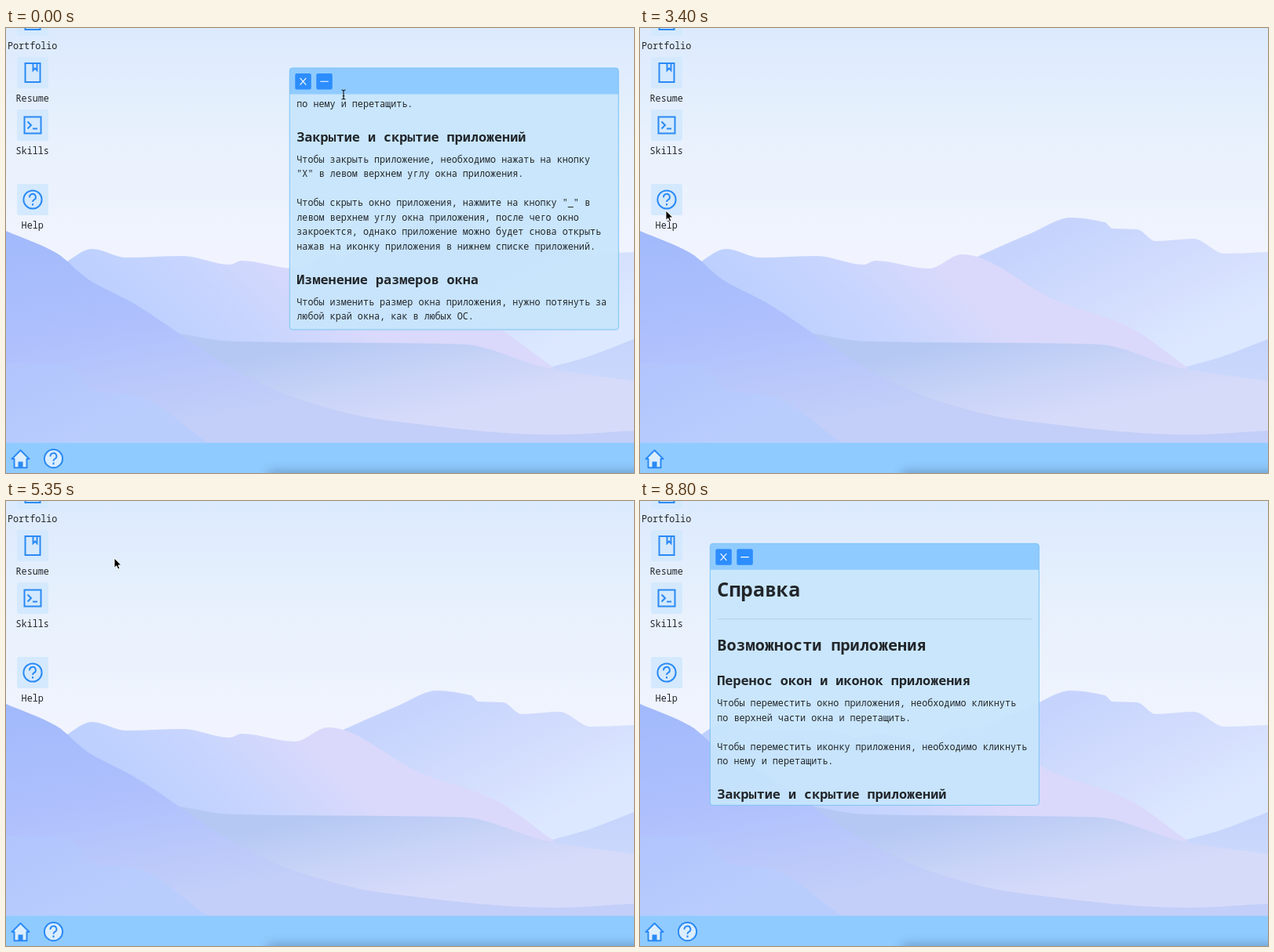
Write an HTML page that moves like this. It is 800 px wide and 568 px high and loops after 8.85 s.

```html
<!DOCTYPE html>
<html lang="ru">
<head>
<meta charset="utf-8">
<title>Desktop</title>
<style>
html, body { margin: 0; width: 100%; height: 100%; overflow: hidden; }
svg { display: block; width: 800px; height: 568px; }
text { font: 500 11.76px "Fira Code", "Fira Mono", "Noto Sans Mono", "DejaVu Sans Mono", monospace; fill: #212529; }
.h1, .h2, .h3 { font-weight: 700; }
.h1 { font-size: 25.2px; }
.h2 { font-size: 20.16px; }
.h3 { font-size: 16.8px; }
.label { text-anchor: middle; }
.line { fill: none; stroke: #2b8af5; stroke-width: 2; }
.tile { fill: #d4e9fd; }
.button { fill: #2d8dfd; }
</style>
</head>
<body>
<svg viewBox="0 0 800 568">
  <defs>
    <filter id="soft" x="-10%" y="-200%" width="120%" height="500%"><feGaussianBlur stdDeviation="6.5"/></filter>
    <clipPath id="pane"><path d="M0 36.5H419V334H0Z"/></clipPath>
    <g id="question" class="line">
      <circle r="11.6"/>
      <path d="M-3.9 -2.7A3.9 3.9 0 1 1 1.6 .3Q0 1.2 0 3.1M0 4.9V7.5"/>
    </g>
    <g id="document" class="line">
      <path d="M-9.500 -12H9.500V12H-9.500ZM.5 -12V-3L3 -5.500 5.500 -3V-12"/>
    </g>
    <g id="terminal" class="line">
      <path d="M-10.500 -10.500H10.500V10.500H-10.500ZM-6.500 -4.500L-2 0 -6.500 4.500M0 4.500H6"/>
    </g>
  </defs>

  <rect id="sky" width="800" height="568"/>
  <g id="hills"></g>
  <g id="icons"></g>

  <rect y="529.5" width="800" height="39" fill="#90cbff"/>
  <rect x="332" y="565" width="520" height="20" rx="8" fill="#203a60" opacity=".3" filter="url(#soft)"/>
  <path d="M18.500 539L7.500 550H10.500V561.200H26.500V550H29.500Z" fill="#dceefe" stroke="#2b8af5" stroke-width="2" stroke-linejoin="round"/>
  <path d="M15.500 561V553.500H21.500V561Z" fill="#2b8af5"/>
  <g id="task" transform="translate(60.5 549.7)">
    <circle r="11.5" fill="#dceefe"/>
    <use href="#question"/>
  </g>

  <g id="window">
    <rect width="419" height="334" rx="3.5" fill="#c7e6fc" fill-opacity=".93"/>
    <g clip-path="url(#pane)"><g id="content"><path d="M9 96.5H410" stroke="#b3d0e6"/></g></g>
    <path d="M0 33.5V3.5A3.5 3.5 0 0 1 3.5 0H415.5A3.5 3.5 0 0 1 419 3.5V33.5Z" fill="#90cbff"/>
    <rect width="419" height="334" rx="3.5" fill="none" stroke="#7cc4f6"/>
    <rect class="button" x="7" y="7" width="20.5" height="20.5" rx="2"/>
    <rect class="button" x="34" y="7" width="20.5" height="20.5" rx="2"/>
    <path d="M13.300 12.800L21 21.600M21 12.800L13.300 21.600M39 17.300H49.500" stroke="#fff" stroke-width="1.1"/>
  </g>

  <g id="pointer">
    <path id="arrow" d="M0 0V12.300L2.800 9.700 4.700 14 6.800 13.100 5 8.900H8.800Z" stroke="#fff" stroke-width=".9"/>
    <path id="beam" d="M-2.500 -6Q-.5 -6 0 -4.800 .5 -6 2.500 -6M0 -4.800V4.800M-2.500 6Q-.5 6 0 4.800 .5 6 2.500 6M-1.300 1.800H1.300" fill="none" stroke="#111" stroke-width="1.1"/>
    <path id="hand" d="M-1.400 1.300Q-1 -.5 .7 .8L2.300 5Q3.500 3.800 4.500 5 5.800 4.200 6.600 5.700 8 5.300 8.300 7V10.500L7.200 14.500H1L-2.800 9.500Q-3.400 7.800 -1.500 8L.2 9ZM2.500 9.500V12M4.500 9.500V12" fill="#fff" stroke="#111" stroke-linejoin="round"/>
  </g>
</svg>
<script>
const LOOP = 8850;
const $ = id => document.getElementById(id);

function add(parent, tag, attrs, content = "") {
  const node = document.createElementNS("http://www.w3.org/2000/svg", tag);
  for (const key in attrs) node.setAttribute(key, attrs[key]);
  node.textContent = content;
  parent.append(node);
  return node;
}

// Evenly spaced colours from one point to another.
function gradient(id, [x1, y1], [x2, y2], ...colors) {
  const node = add(document.querySelector("defs"), "linearGradient",
    { id, gradientUnits: "userSpaceOnUse", x1, y1, x2, y2 });
  colors.forEach((color, i) => add(node, "stop", { offset: i / (colors.length - 1), "stop-color": color }));
  return `url(#${id})`;
}

// Monotone cubic through the key points: level at every crest and dip.
function ridge(fill, ...points) {
  const slope = i => (points[i + 1][1] - points[i][1]) / (points[i + 1][0] - points[i][0]);
  const tangent = i => {
    if (i === 0) return slope(0);
    if (i === points.length - 1) return slope(i - 1);
    const a = slope(i - 1), b = slope(i);
    return a * b > 0 ? 2 * a * b / (a + b) : 0;
  };
  let d = `M${points[0]}`;
  for (let i = 0; i < points.length - 1; i++) {
    const [x0, y0] = points[i], [x1, y1] = points[i + 1], third = (x1 - x0) / 3;
    d += `C${x0 + third} ${y0 + third * tangent(i)} ${x1 - third} ${y1 - third * tangent(i + 1)} ${x1} ${y1}`;
  }
  add($("hills"), "path", { d: `${d}V530H${points[0][0]}Z`, fill });
}

$("sky").setAttribute("fill", gradient("air", [0, 0], [0, 290], "#dceafe", "#e8f1fc", "#f1f4fe"));
ridge(gradient("far", [560, 250], [650, 430], "#c6d4fd", "#d2dcfd", "#dce8ff"),
  [418, 297], [498, 262], [549, 242], [592, 248], [602, 256], [633, 257], [657, 272], [705, 269], [745, 288], [800, 286]);
ridge(gradient("hill", [0, 395], [0, 530], "#c5d4fc", "#d3defc"), [690, 434], [740, 420], [800, 397]);
ridge(gradient("middle", [180, 400], [330, 250], "#bccffe", "#c7d5fe", "#dad9fb"),
  [70, 303], [110, 282], [153, 293], [225, 291], [285, 302], [300, 297], [368, 307], [410, 289], [530, 348], [620, 380], [697, 433]);
ridge(gradient("valley", [430, 396], [455, 515], "#b5c8f3", "#c7d3f7", "#d7dbfa"),
  [205, 387], [290, 400], [580, 403.5], [690, 434], [800, 451]);
ridge(gradient("front", [60, 260], [110, 530], "#a2bafb", "#afc0fd", "#c3cff8"),
  [0, 259], [64, 287], [105, 321], [160, 350], [300, 441], [380, 476], [480, 500], [700, 519], [800, 514]);
ridge(gradient("corner", [40, 425], [90, 530], "#b2c5fd", "#b9cdfd"),
  [0, 427], [80, 430], [112, 463], [165, 469], [257, 529]);

function icon(name, shape, y) {
  const x = 34;
  add($("icons"), "rect", { class: "tile", x: x - 20, y: y - 20, width: 40, height: 40, rx: 3 });
  add($("icons"), "use", { href: `#${shape}`, x, y });
  add($("icons"), "text", { class: "label", x: x - .3, y: y + 37 }, name);
}
icon("Portfolio", "document", -10);
icon("Resume", "document", 57);
icon("Skills", "terminal", 124);
icon("Help", "question", 219);

const LINE = 18.45;
const gapBefore = { h1: 68, h2: 69, h3: 44, p: 27 };
const helpText = `h1 Справка
h2 Возможности приложения
h3 Перенос окон и иконок приложения
p Чтобы переместить окно приложения, необходимо кликнуть
по верхней части окна и перетащить.

Чтобы переместить иконку приложения, необходимо кликнуть
по нему и перетащить.
h3 Закрытие и скрытие приложений
p Чтобы закрыть приложение, необходимо нажать на кнопку
"X" в левом верхнем углу окна приложения.

Чтобы скрыть окно приложения, нажмите на кнопку "_" в
левом верхнем углу окна приложения, после чего окно
закроектся, однако приложение можно будет снова открыть
нажав на иконку приложения в нижнем списке приложений.
h3 Изменение размеров окна
p Чтобы изменить размер окна приложения, нужно потянуть за
любой край окна, как в любых ОС.`;
let baseline = 0;
for (const line of helpText.split("\n")) {
  const [, kind, words] = line.match(/^(?:(h\d|p) )?(.*)$/);
  baseline += gapBefore[kind] || LINE;
  add($("content"), "text", { class: kind || "p", x: 9, y: baseline }, words);
}

const CLOSE = 1100, OPEN = 3600, MINIMISE = 4900, RESTORE = 7200;
const glides = [
  { from: 0, to: 700, x: 379, y: 68 },
  { from: 1200, to: 1850, x: 80, y: 494 },
  { from: 2350, to: 3300, x: 33, y: 233 },
  { from: 3750, to: 4550, x: 137, y: 82 },
  { from: 4700, to: 4850, x: 138, y: 73 },
  { from: 5450, to: 6550, x: 64, y: 552 },
  { from: 7400, to: 7950, x: 76, y: 590 }
];

function pointerAt(t) {
  let x = 430, y = 85;
  for (const glide of glides) {
    const u = Math.min(1, Math.max(0, (t - glide.from) / (glide.to - glide.from)));
    const ease = u * u * (3 - 2 * u);
    x += (glide.x - x) * ease;
    y += (glide.y - y) * ease;
  }
  return [x, y];
}

const show = (id, visible) => $(id).setAttribute("visibility", visible ? "visible" : "hidden");
const move = (id, x, y) => $(id).setAttribute("transform", `translate(${x} ${y})`);

function draw(t) {
  const first = t < CLOSE;
  show("window", first || (t >= OPEN && t < MINIMISE) || t >= RESTORE);
  show("task", first || t >= OPEN);
  move("window", first ? 361.3 : 89.3, first ? 51 : 54.3);
  move("content", 0, first ? -232 : 0);

  const [x, y] = pointerAt(t);
  const onText = first && y > 83;
  const onTask = t >= OPEN && Math.hypot(x - 60.5, y - 549.7) < 14;
  move("pointer", x, y);
  show("beam", onText);
  show("hand", onTask);
  show("arrow", !onText && !onTask);
}

const start = performance.now();
function tick() {
  draw((performance.now() - start) % LOOP);
  requestAnimationFrame(tick);
}
tick();
</script>
</body>
</html>
```
